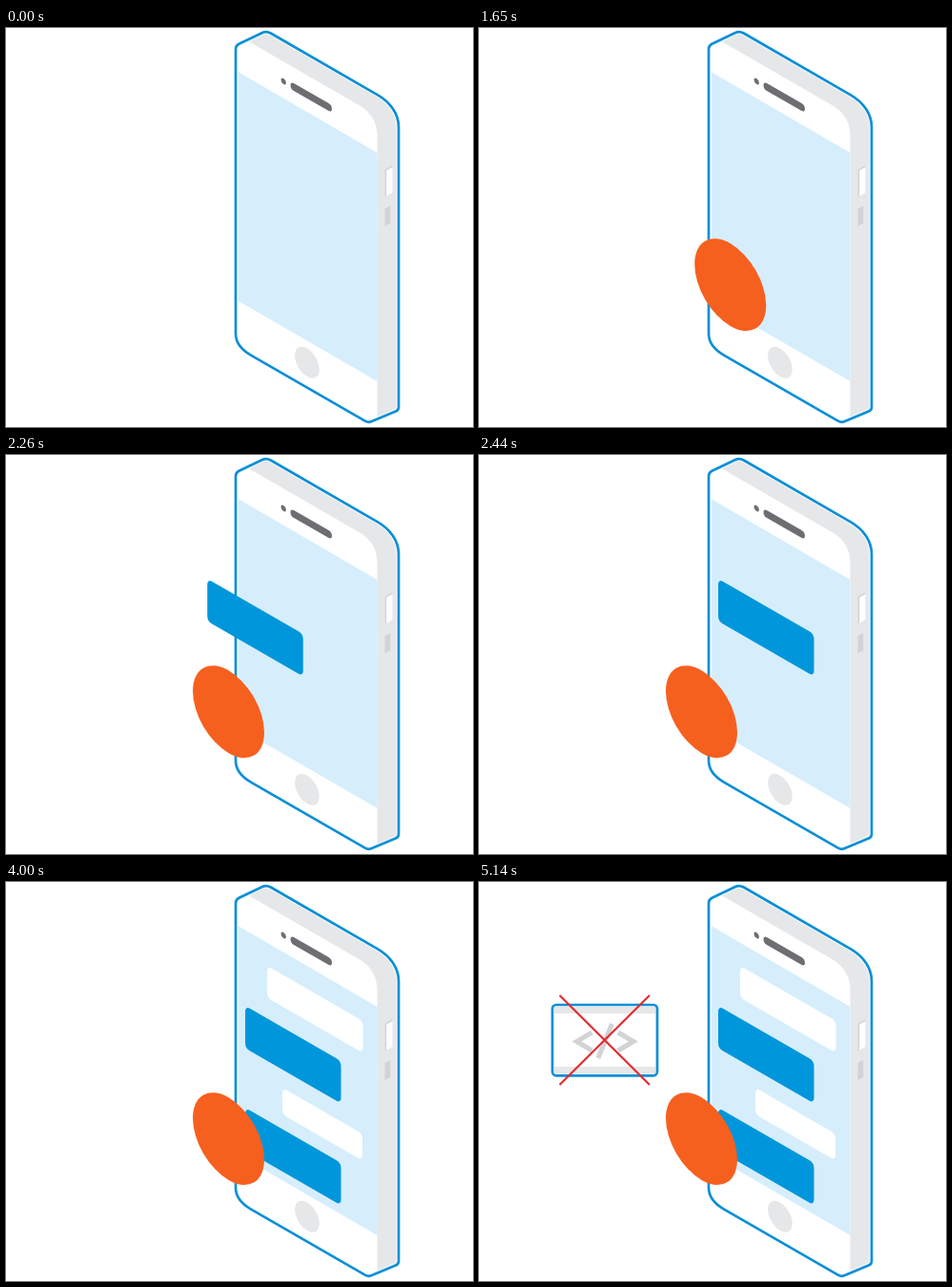
Write an HTML page with a canvas that moves like this. It is 490 px wide and 419 px high and loops after 6.47 s.

```html
<!DOCTYPE html>
<html lang="en">
<head>
<meta charset="utf-8">
<title>Phone chat</title>
<style>
  html, body { margin: 0; width: 100%; height: 100%; overflow: hidden; background: #fff; }
  canvas { display: block; width: 490px; height: 419px; }
</style>
</head>
<body>
<canvas id="stage" width="490" height="419"></canvas>
<script>
const ctx = document.getElementById('stage').getContext('2d');
const LOOP = 6470, STEP = 30;
const BLUE = '#0096dc', LINE = '#0b8fd6', GRAY = '#e6e7e8', MID = '#d1d3d4',
      DARK = '#6d6e71', SCREEN = '#d6eefc', ORANGE = '#f6601f', RED = '#e5282b';

const outline = new Path2D();
outline.moveTo(241, 60);
outline.arcTo(241, 18.4, 273.2, 2.9, 6);
outline.arcTo(273.2, 2.9, 390, 70.3, 10);
outline.lineTo(390, 70.3);
outline.bezierCurveTo(403, 77.8, 412, 90, 412, 104);
outline.arcTo(412, 401.3, 380.1, 414.6, 5);
outline.arcTo(380.1, 414.6, 257, 343.6, 7);
outline.lineTo(257, 343.6);
outline.bezierCurveTo(247, 337.8, 241, 331, 241, 321);
outline.closePath();

const front = new Path2D('M230 0 L372 82 C382 88 389.5 99 389.5 113 V419 H230 Z');

// Position of a linear slide that advances in fixed steps.
function slide(t, start, steps, from, to) {
  const i = Math.floor((t - start) / STEP);
  const k = Math.max(0, Math.min(1, i / (steps - 1)));
  return from + (to - from) * k;
}

function fill(color, path) {
  ctx.fillStyle = color;
  ctx.fill(path);
}

function stroke(color, width, path) {
  ctx.strokeStyle = color;
  ctx.lineWidth = width;
  ctx.stroke(path);
}

// Draws in the plane of the phone's front, with (x, y) as origin.
function onFront(x, y, color, build) {
  ctx.save();
  ctx.transform(0.866, 0.5, 0, 1, x, y);
  const path = new Path2D();
  build(path);
  fill(color, path);
  ctx.restore();
}

function disc(x, y, r, color) {
  onFront(x, y, color, p => p.arc(0, 0, r, 0, 2 * Math.PI));
}

function bubble(x, y, w, h, color, r = 5.5) {
  onFront(x, y, color, p => p.roundRect(0, 0, w / 0.866, h, r));
}

function phone() {
  ctx.save();
  ctx.clip(outline);
  fill(GRAY, outline);
  fill('#fff', front);
  fill(SCREEN, new Path2D('M243.5 46 L389.5 131 V371 L243.5 286.5 Z'));
  stroke('#fff', 4.6, outline);
  ctx.restore();
  stroke(LINE, 2.7, outline);

  bubble(298.5, 56, 43.5, 8, DARK, 4);
  disc(291.2, 56, 3.1, DARK);
  disc(315.9, 351.3, 14.8, GRAY);

  fill(MID, new Path2D('M397.7 148.5 L405.4 144.3 V173 L397.7 177 Z'));
  fill('#fff', new Path2D('M399.2 149.5 L405.6 146 V173 L399.2 176.5 Z'));
  fill(MID, new Path2D('M397.5 190 L403.2 186.7 V205 L397.5 208.2 Z'));
}

function codeWindow(x) {
  ctx.save();
  ctx.translate(x, 0);
  const frame = new Path2D();
  frame.roundRect(77, 129, 110, 74.3, 4);
  fill('#fff', frame);
  fill(GRAY, new Path2D('M79 131 H185 V138 H79 Z M79 194 H185 V201.5 H79 Z'));
  stroke(LINE, 2.7, frame);
  stroke(MID, 5, new Path2D(
    'M118.5 158 L102.5 167.5 L118.5 177 M139.5 149 L125 185 M146 158 L162 167.5 L146 177'));
  ctx.restore();
}

function draw(t) {
  ctx.fillStyle = '#fff';
  ctx.fillRect(0, 0, 490, 419);
  phone();
  if (t >= 2200) bubble(slide(t, 2200, 9, 198, 251), 130, 100.5, 44.5, BLUE);
  if (t >= 3000) bubble(slide(t, 3000, 10, 211, 274), 88, 100.5, 33.5, '#fff');
  if (t >= 3670) bubble(290, 216, 84, 28, '#fff');
  if (t >= 4000) bubble(251, 237, 100.5, 44.5, BLUE);
  if (t >= 1500) disc(slide(t, 1500, 10, 301.5, 233.5), 269.6, 43.3, ORANGE);
  if (t >= 4660) codeWindow(slide(t, 4660, 8, 56.5, 0));
  if (t >= 5140) stroke(RED, 2.1, new Path2D('M84.5 119 L179 213 M179 119 L84.5 213'));
}

const begin = performance.now();
function tick() {
  draw((performance.now() - begin) % LOOP);
  requestAnimationFrame(tick);
}
tick();
</script>
</body>
</html>
```
